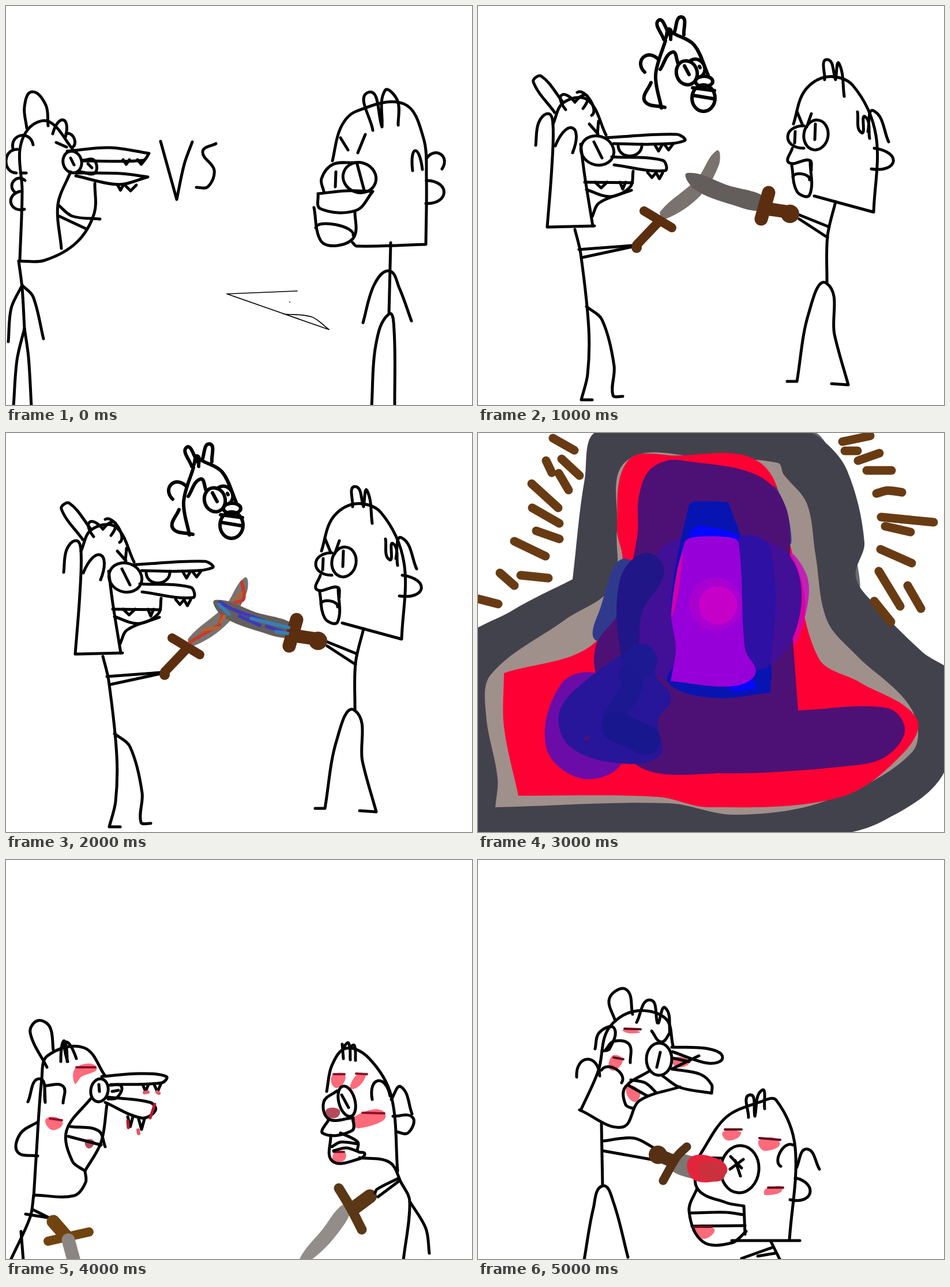
An HTML page that plays this animation: 808 px wide and 693 px high, repeating every 6000 ms.

```html
<!DOCTYPE html>
<html lang="en">
<head>
<meta charset="utf-8">
<title>Sword duel</title>
<style>
html, body { margin: 0; width: 100%; height: 100%; overflow: hidden; background: #fff; }
svg { display: block; width: 100%; height: 100%; }
path, ellipse { stroke-linecap: round; stroke-linejoin: round; }
.scene { visibility: hidden; animation: one 6s step-end infinite; animation-delay: calc(var(--at) * 1s); }
.scene.long { animation-name: two; }
@keyframes one { 0% { visibility: visible } 16.6667%, 100% { visibility: hidden } }
@keyframes two { 0% { visibility: visible } 33.3333%, 100% { visibility: hidden } }
</style>
</head>
<body>
<svg id="stage" viewBox="0 0 808 693"></svg>
<script>
const stage = document.getElementById('stage');
let scene, pen;

function add(parent, tag, attrs) {
  const el = document.createElementNS('http://www.w3.org/2000/svg', tag);
  for (const key in attrs) el.setAttribute(key, attrs[key]);
  return parent.appendChild(el);
}

function setPen(width = 5, color = '#000') {
  pen = { fill: 'none', stroke: color, 'stroke-width': width };
}

function startScene(at, long) {
  scene = add(stage, 'g', { class: long ? 'scene long' : 'scene', style: `--at:${at}` });
  setPen();
}

// Smooth curve through "x,y x,y"; a doubled point makes a corner.
function curve(text, closed) {
  const p = text.split(' ').map(s => s.split(',').map(Number));
  const n = p.length;
  const at = i => closed ? p[(i + n) % n] : p[Math.max(0, Math.min(n - 1, i))];
  let d = 'M' + p[0];
  for (let i = 0; i < (closed ? n : n - 1); i++) {
    const [a, b, c, e] = [at(i - 1), at(i), at(i + 1), at(i + 2)];
    const reach = Math.hypot(c[0] - b[0], c[1] - b[1]) / 3;
    const pull = (from, to, k) => (to[k] - from[k]) / (Math.hypot(to[0] - from[0], to[1] - from[1]) || 1) * reach;
    d += `C${[0, 1].map(k => b[k] + pull(a, c, k))} ${[0, 1].map(k => c[k] - pull(b, e, k))} ${c}`;
  }
  return d;
}

function line(...strokes) {
  for (const s of strokes) add(scene, 'path', { ...pen, d: curve(s) });
}

function blob(color, ...shapes) {
  for (const s of shapes) add(scene, 'path', { d: curve(s, true), fill: color });
}

// U-shaped arc, lifted to the left of its direction of travel.
function bump(x1, y1, x2, y2, lift) {
  const k = lift * 4 / 3 / Math.hypot(x2 - x1, y2 - y1);
  const dx = (y2 - y1) * k, dy = (x1 - x2) * k;
  add(scene, 'path', { ...pen, d: `M${x1} ${y1}C${x1 + dx} ${y1 + dy} ${x2 + dx} ${y2 + dy} ${x2} ${y2}` });
}

function oval(cx, cy, rx, ry, tilt = 0) {
  add(scene, 'ellipse', { ...pen, cx, cy, rx, ry, transform: `rotate(${tilt} ${cx} ${cy})` });
}

function fang(x, y, w, h) {
  add(scene, 'path', { ...pen, d: `M${x} ${y}l${w / 2} ${h}l${w / 2} ${-h}` });
}

function disc(cx, cy, r, fill) { add(scene, 'circle', { cx, cy, r, fill }); }

const PINK = '#ff6b7a';

function faceOff() {
  startScene(0);
  line('36,212 32,175 45,149 69,172 73,208', '24,441 28,320 24,250 42,210 75,201 115,248', '87,237 105,245', '25,290 35,290');
  bump(81, 222, 103, 228, 28);
  bump(104, 222, 114, 246, 10);
  bump(12, 248, 47, 241, 20);
  bump(20, 249, 18, 290, -19);
  bump(33, 303, 15, 323, -14);
  bump(24, 322, 32, 353, -20);
  line('106,252 180,246 248,256 248,256 238,268 132,269', '112,264 118,276', '133,268 153,268 154,290 130,288', '142,274 149,281');
  line('121,290 200,291 246,297 246,297 195,310 121,295');
  oval(115, 271, 16, 19, -15);
  fang(203, 267, 11, 8);
  fang(228, 267, 13, 8);
  fang(193, 310, 11, 10);
  fang(206, 311, 20, 10);
  line('112,288 90,345 96,421', '90,345 115,365 163,370', '90,364 139,387', '154,308 153,360 122,411 66,442 22,443');
  line('22,443 28,490 32,560', '28,485 9,525 4,583', '28,485 47,505 65,578', '32,560 19,615 13,695', '32,560 39,610 44,695');

  line('268,235 296,336 296,336 309,275 323,236', '364,239 341,253 361,285 350,314 330,315');
  setPen(1.7);
  line('505,495 383,500 383,500 560,562 560,562 530,540 481,535', '492,514 492,514.5');
  setPen();

  line('636,216 628,150 652,210 652,210 657,147 679,165 680,207');
  line('566,269 580,212 607,183 690,170 724,230 729,300 728,414 728,414 608,417 601,411');
  line('580,229 593,250', '623,223 610,255');
  bump(705, 286, 722, 284, 34);
  bump(729, 265, 756, 283, 20);
  bump(729, 303, 728, 343, 31);
  oval(613, 298, 29, 26, 20);
  line('551,322 547,300 567,275 605,272', '609,275 621,320', '572,288 571,314');
  line('541,326 590,321 636,322 636,322 607,355 545,352 541,326', '534,350 546,408 575,416 604,400 605,357');
  bump(537, 385, 602, 398, 12);
  line('667,411 664,535', '619,550 638,485 664,460 682,490 703,547', '634,695 641,590 664,535 673,565 674,695');
}

function duel() {
  startScene(1, true);
  line('133,185 96,132 110,122 148,168', '130,205 148,168 190,163 222,224', '193,205 208,222', '209,200 207,222');
  bump(152, 180, 168, 167, 24);
  bump(168, 167, 182, 178, 22);
  bump(172, 150, 197, 190, 12);
  line('100,242 105,203 122,187 130,205 128,280 120,384 120,384 202,382', '178,240 185,295 199,382');
  bump(134, 243, 164, 255, 40);
  oval(207, 251, 29, 25, 20);
  line('201,236 215,264', '219,229 345,223 358,234 300,240 235,239', '232,262 320,268 324,286 236,276');
  bump(243, 243, 284, 240, -19);
  fang(306, 240, 14, 12);
  fang(323, 240, 15, 10);
  fang(294, 289, 15, 9);
  fang(309, 290, 11, 10);
  fang(203, 306, 21, 10);
  fang(246, 306, 10, 12);
  line('185,306 268,307', '269,287 264,314 230,331 188,319', '266,320 210,342 198,366');
  line('168,388 178,430 192,560 190,640 179,684 179,684 198,684', '188,522 215,545 236,625 234,676 251,678');
  line('175,423 268,416', '180,437 268,418');

  setPen(6);
  line('322,58 313,25 332,50', '340,47 353,19 357,50', '326,55 332,40 334,58');
  line('325,60 308,120 318,177', '340,48 375,68 399,120', '316,110 337,80 347,100', '300,133 289,165 324,176');
  bump(289, 115, 312, 92, 20);
  oval(362, 116, 18, 21, -15);
  bump(368, 95, 386, 123, 16);
  line('358,104 366,119', '384,105 385,107', '372,142 410,147', '372,155 408,161');
  oval(392, 131, 15, 9);
  oval(391, 160, 20, 23);
  setPen();

  line('601,128 605,93 620,128 620,128 626,100 635,157', '553,183 562,205', '578,187 570,210');
  line('547,205 566,148 605,123 650,138 690,225 686,358 686,358 583,330');
  line('658,184 665,220 671,192 679,230', '676,218 686,182 712,236');
  bump(687, 247, 682, 283, 36);
  oval(586, 224, 21, 26, 10);
  bump(565, 208, 565, 247, -28);
  line('550,218 549,238', '585,205 584,232', '545,247 539,272 575,268 578,285', '544,277 553,322 575,328 576,270');
  bump(546, 297, 575, 302, 8);
  line('620,340 606,400 605,482', '555,362 607,383', '557,370 606,402');
  line('536,652 553,652 553,652 573,535 605,482 618,570 642,658 642,658 613,656');

  blob('#7a726e', '316,357 380,300 414,251 418,275 385,330 325,370');
  blob('#635e5b', '363,290 435,312 500,333 495,355 440,345 375,318');
  setPen(16, '#5c2e10');
  line('288,356 336,385', '315,373 275,415');
  disc(275, 420, 9, '#5c2e10');
  setPen(23, '#5c2e10');
  line('504,324 491,370', '500,352 540,358');
  disc(541, 361, 16, '#5c2e10');
}

function enchantedBlades() {
  startScene(2);
  setPen(6, '#c53b2d');
  line('319,363 365,336', '376,315 370,333', '409,259 412,288 396,295');
  setPen(5, '#b8622e');
  line('342,342 368,338', '372,328 379,318', '398,288 408,278');
  setPen(6, '#4038b8');
  line('371,294 395,307 447,326', '405,318 440,334', '452,336 488,348');
  setPen(6, '#357fb5');
  line('369,298 387,315', '425,322 490,338', '468,345 488,348');
}

function clash() {
  startScene(3);
  blob('#6a6a6e', '560,-5 590,2 602,24', '650,215 657,222 657,270');
  blob('#42424d', '210,-4 185,80 164,254 164,254 60,308 -40,380 -60,740 600,700 700,675 808,590 830,430 770,380 690,300 655,250 670,190 640,65 595,10 560,-4');
  blob('#a0908b', '258,48 241,170 234,265 150,325 22,420 14,490 34,600 30,650 30,650 330,643 445,663 600,640 752,555 752,480 655,385 605,325 585,210 570,122 530,72 520,52 400,44');
  blob('#ff0034', '260,48 340,39 490,52 540,190 590,390 662,433 760,495 740,553 630,632 400,650 312,632 70,630 70,630 45,510 45,417 45,417 205,362 250,225 241,165');
  blob('#c022b8', '538,212 571,250 568,315 545,362');
  blob('#da00a0', '538,212 562,260 565,325 540,370');
  blob('#303a8c', '512,95 536,135 539,190', '262,220 210,310 206,361 245,325');
  blob('#6b0ca8', '145,435 208,418 250,470 250,572 180,600 118,545');
  blob('#4d1176', '279,110 300,62 350,47 518,100 540,290 555,482 555,482 710,478 740,515 710,560 655,577 425,591 270,573 205,420 206,365 245,310 276,180');
  blob('#420f97', '330,190 400,180 540,213 543,362 430,440 330,432 275,365 300,235');
  blob('#27159a', '140,490 175,440 285,367 310,385 308,420 335,460 312,500 315,560 240,573 160,545');
  blob('#211687', '290,208 323,240 285,310 272,395 248,385 246,255');
  disc(280, 397, 30, '#1d1992');
  setPen(36, '#1b1892');
  line('262,420 268,440 235,490');
  setPen(52, '#19178e');
  line('240,510 290,533');
  setPen(6, '#4d1176');
  line('186,531 192,529');
  blob('#0714b2', '365,128 375,119 434,120 434,120 460,200 470,380 505,395 507,451 507,451 410,460 330,434 345,390 335,290');
  blob('#0508ff', '368,181 385,161 453,192', '435,443 470,425 485,444 485,444');
  blob('#2f10a4', '452,185 506,198 507,398 480,410 463,378');
  blob('#9700d8', '358,190 375,181 435,181 452,191 463,375 481,418 440,440 334,431 334,431 343,375 335,310');
  blob('#d200a8', '355,210 338,315 345,240');
  disc(412, 297, 46, '#a900d2');
  disc(416, 299, 33, '#c700c9');
  setPen(15, '#693b13');
  line('130,9 167,30', '118,48 128,69', '145,45 176,74', '140,70 157,99', '93,88 139,130', '94,130 141,157');
  line('101,170 141,184', '63,188 117,214', '38,243 63,265', '74,247 122,252', '0,288 35,297');
  line('632,15 680,5', '636,31 658,31', '659,48 696,35', '674,65 717,65', '691,105 710,100 735,103', '699,146 790,155');
  line('706,162 750,172', '698,202 752,226', '695,240 732,301', '745,265 768,305', '687,292 716,328');
}

function wounded() {
  startScene(4);
  blob(PINK, '122,360 157,360 130,377 119,388', '70,449 98,455 80,469', '565,375 588,374 573,396', '606,375 624,374 600,398');
  blob(PINK, '600,448 657,440 612,466', '570,508 588,508 586,522 568,523');
  blob('#b54b5a', '138,487 153,489 143,501', '557,432 578,434 574,447 556,445');
  line('71,360 42,300 55,279 76,290 82,330', '48,585 52,520 62,380 72,340 135,326 172,375');
  bump(95, 350, 106, 350, 36);
  bump(107, 350, 122, 345, 33);
  line('38,420 58,380 68,421 68,421 67,392 67,392 99,393 99,422', '55,455 25,475 20,507 55,514', '34,615 78,622', '46,607 78,623');
  line('166,376 230,371 278,376 270,387 182,390', '161,390 162,402', '180,391 200,393 192,413 177,415', '184,402 195,400');
  oval(162, 400, 15, 20, 10);
  fang(237, 390, 10, 12);
  fang(257, 390, 11, 13);
  line('172,421 235,448 259,435 250,421 178,412');
  fang(211, 446, 9, 17);
  fang(230, 450, 10, 18);
  line('148,413 105,470 115,523 137,540', '175,425 165,490 137,540 137,540 138,560 118,583 50,582', '112,463 160,470 172,498', '108,480 165,495');
  line('48,582 42,620 8,695', '26,645 30,695');
  setPen(4, '#8c1029');
  line('122,360 155,360', '76,449 97,452', '568,372 587,372', '607,371 626,372', '618,439 656,440', '568,507 586,507');
  setPen(5, '#b81832');
  line('258,424 250,448', '211,453 212,465');
  setPen(6, '#e85767');
  line('240,404 246,403', '262,403 265,405', '229,469 230,475');

  blob('#928d89', '582,600 600,603 570,655 525,697 508,695 550,640');
  setPen(17, '#5a3715');
  line('577,570 597,603 617,642');
  setPen(24, '#5a3715');
  line('604,604 631,584');
  setPen(16, '#71440f');
  line('73,662 144,646');
  setPen(23, '#71440f');
  line('82,628 103,652');
  setPen(23, '#8a8582');
  line('108,660 118,697');
  setPen();

  line('583,320 585,345', '585,325 594,318 597,347', '596,325 604,322 606,348');
  line('556,402 565,357 590,327 630,345 668,410 679,540');
  oval(591, 419, 14, 27, -15);
  line('574,401 551,420 560,450 600,448', '582,408 594,430', '560,450 550,475 600,470 602,448');
  line('563,478 566,523 613,519 622,510 610,506 610,490 580,474', '565,498 580,490 610,493', '568,505 590,500 610,506');
  line('613,517 665,525 685,560 700,593 689,695', '700,593 728,640 734,683');
  bump(635, 416, 666, 410, 30);
  line('668,416 685,394 704,441', '671,445 705,447 697,474 677,472', '680,553 643,572 640,578', '681,558 645,585');
}

function finalBlow() {
  startScene(5);
  blob(PINK, '425,472 455,472 450,483 430,486', '488,486 523,490 496,505', '499,571 528,571 498,582', '251,295 280,298 262,301');
  blob(PINK, '233,340 251,348 231,365', '258,394 281,402 270,420', '338,344 366,350 345,360', '373,639 409,640 392,658');
  line('238,280 228,240 257,225 268,268', '178,435 209,365 225,295 270,263 325,275 338,322', '301,297 318,316 334,298');
  line('275,282 298,243 311,283', '313,283 325,257 333,303');
  line('203,328 210,300 236,292 228,328 215,332', '221,330 235,315 262,320 264,352');
  bump(171, 377, 211, 375, 30);
  bump(214, 365, 249, 387, 15);
  oval(314, 346, 22, 28);
  line('316,334 310,360', '336,325 400,328 424,343 400,353 337,333', '337,344 366,350', '383,340 338,362');
  line('336,363 385,372 405,390 405,405 405,405 350,395 320,375', '298,366 255,395 256,425 270,432');
  line('265,382 290,387 308,403', '262,392 294,410', '350,394 280,418 250,464 176,434');
  line('214,457 216,566', '216,488 270,483 305,500', '216,505 300,520', '184,695 200,605 216,566 235,595 260,690');

  line('383,515 430,447 490,420 517,417 550,500 540,660', '469,447 471,408 480,445 480,445 492,400 497,432');
  oval(454, 537, 33, 41, 5);
  line('385,517 425,518', '383,515 380,570 430,595 461,601 461,601 463,650');
  line('380,570 366,610 390,663 440,665 465,645', '369,613 430,612 460,616', '371,636 463,635', '440,661 558,661');
  bump(525, 532, 546, 495, 13);
  line('552,535 570,502 592,537');
  bump(550, 552, 541, 590, 31);
  line('508,663 524,695', '457,692 510,673', '485,688 515,683');
  setPen(4, '#5c0c1c');
  line('428,468 457,468', '488,483 524,486', '503,569 529,569', '254,293 282,294', '235,343 252,346', '374,637 405,637');
  blob('#7d7672', '334,512 375,515 425,527 430,545 400,556 336,540');
  blob('#e3253b', '369,516 418,520 432,541 405,559 369,551');
  blob('#cb303d', '385,528 422,530 424,555 390,552');
  setPen();
  line('438,515 457,535', '460,520 437,537', '446,522 455,549');
  setPen(15, '#553015');
  line('362,498 345,515 321,557');
  setPen(23, '#553015');
  line('312,512 335,522');
  disc(312, 512, 16, '#553015');
}

[faceOff, duel, enchantedBlades, clash, wounded, finalBlow].forEach(draw => draw());
</script>
</body>
</html>
```
